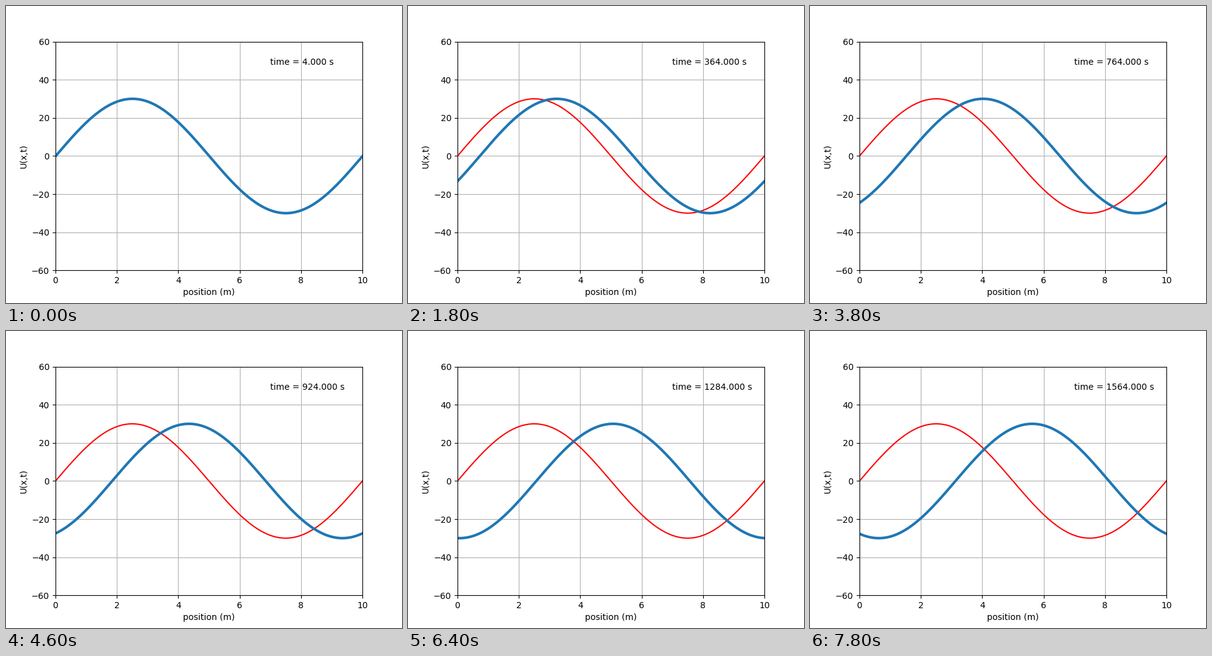
Write a matplotlib script that moves like this. It is 640 by 480 pixels and loops after 8 s.

```python
import numpy as np
import matplotlib.pyplot as plt
from matplotlib.animation import FuncAnimation

LENGTH = 10.0      # m
AMPLITUDE = 30.0
SPEED = 0.002      # m/s
START, STEP = 4.0, 40.0   # s
FRAMES = 40


def wave(x, t):
    return AMPLITUDE * np.sin(2 * np.pi * (x - SPEED * t) / LENGTH)


x = np.linspace(0, LENGTH, 201)

fig, ax = plt.subplots(figsize=(6.4, 4.8), dpi=100)
ax.set(xlim=(0, LENGTH), ylim=(-60, 60),
       xlabel="position (m)", ylabel="U(x,t)")
ax.grid()

ax.plot(x, wave(x, 0), color="red", lw=1.5)
line, = ax.plot(x, wave(x, START), color="tab:blue", lw=3)
label = ax.text(0.7, 0.9, "", transform=ax.transAxes)


def update(i):
    t = START + STEP * i
    line.set_ydata(wave(x, t))
    label.set_text(f"time = {t:.3f} s")
    return line, label


anim = FuncAnimation(fig, update, frames=FRAMES, interval=200,
                     repeat=True, repeat_delay=0)
plt.show()
```
